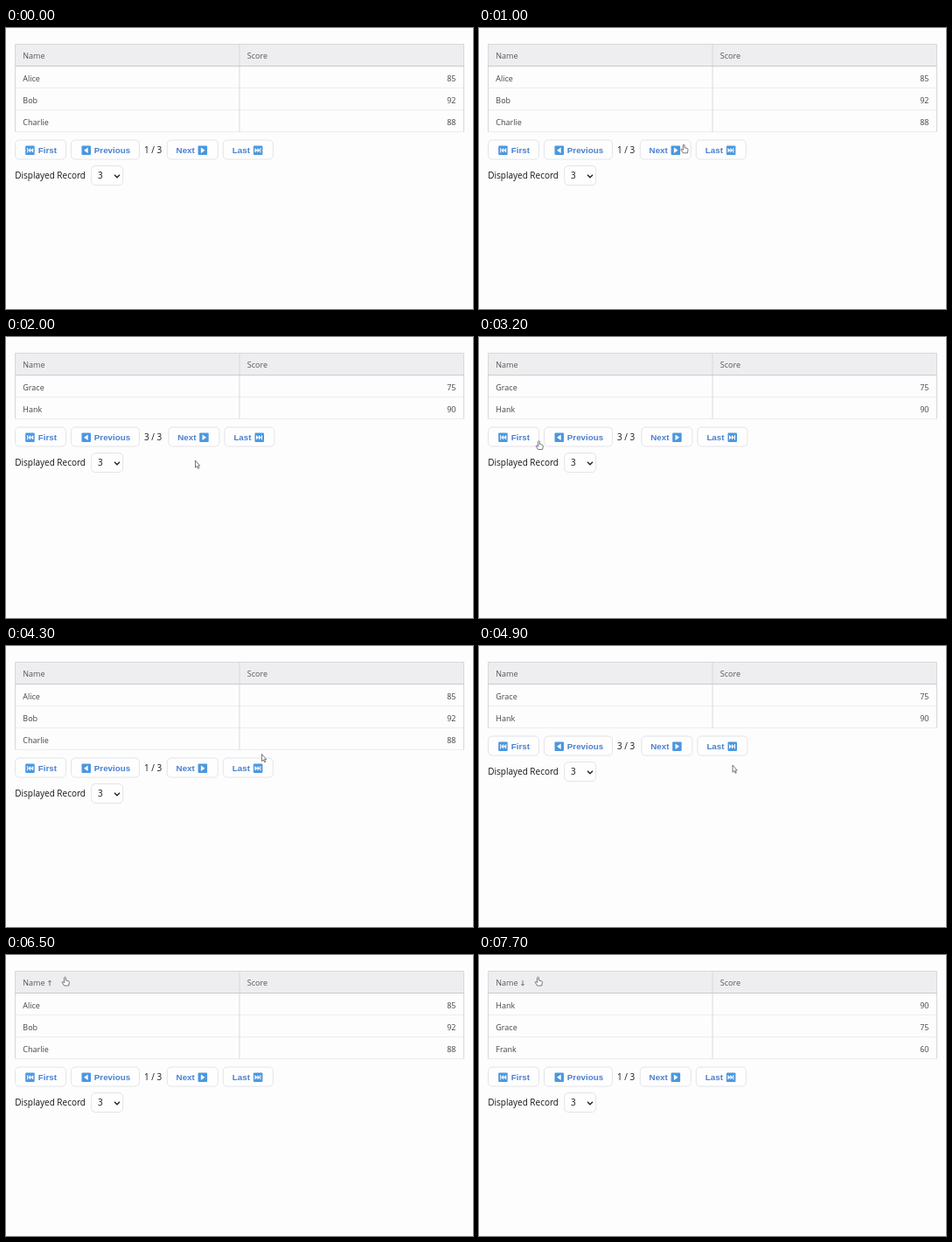
These frames come from a looping animation (534x321 px, 8 s). An HTML page:

```html
<!DOCTYPE html>
<html lang="en">
<head>
<meta charset="utf-8">
<title>Paged table</title>
<style>
  html, body { margin: 0; width: 100%; height: 100%; overflow: hidden; background: #fdfdfd; }
  svg { display: block; width: 100%; height: 100%; }
  text { font: 9px "Open Sans", "Noto Sans", sans-serif; fill: #444; white-space: pre; }
  .head { fill: #55565a; }
  .label { font-size: 10px; font-weight: 500; fill: #161616; }
  .button { font: bold 9.8px "Liberation Sans", Arial, sans-serif; fill: #4a80d0; }
  .end { text-anchor: end; }
</style>
</head>
<body>
<svg id="stage" viewBox="0 0 534 321"></svg>
<script>
const stage = document.getElementById('stage');
const LOOP = 8000;
const PAGE_SIZE = 3;
const records = [
  ['Alice', 85], ['Bob', 92], ['Charlie', 88], ['David', 70],
  ['Eve', 95], ['Frank', 60], ['Grace', 75], ['Hank', 90]
];

// [time, value]: each value holds until the next entry
const pages = [[0, 1], [1400, 2], [1800, 3], [3400, 1], [4600, 3], [6000, 1]];
const sorts = [[0, ''], [6500, 'up'], [6800, 'down'], [7050, ''], [7500, 'up'], [7700, 'down']];
const presses = [[0, ''], [1300, 'Next'], [1400, ''], [1720, 'Next'], [1800, ''], [3300, 'First'], [3400, ''],
  [4500, 'Last'], [4600, ''], [5650, 'First'], [6000, '']];

// [time, x, y] of the pointer tip
const path = [
  [400, 322, 0], [800, 262, 120], [1150, 216.5, 141], [2200, 216.5, 141], [3200, 68.5, 118.5],
  [3300, 45, 115], [4100, 45, 115], [4300, 292.5, 123.5], [4450, 290, 136], [4950, 290, 136],
  [5300, 25.5, 112], [6000, 25.5, 112], [6300, 67.5, 25], [8000, 67.5, 25]
];

const holdAt = (list, t) => list.filter(([start]) => start <= t).pop()[1];

function pointerAt(t) {
  const i = path.findIndex(([time]) => time > t);
  if (i < 1) return null;
  const [t0, x0, y0] = path[i - 1], [t1, x1, y1] = path[i];
  const p = (t - t0) / (t1 - t0), e = p * p * (3 - 2 * p);
  return { x: x0 + (x1 - x0) * e, y: y0 + (y1 - y0) * e };
}

const text = (x, y, value, cls = '') => `<text x="${x}" y="${y}" class="${cls}">${value}</text>`;
const line = (d, color, width = 1) => `<path d="${d}" fill="none" stroke="${color}" stroke-width="${width}"/>`;
const box = (x, y, w, h, fill) =>
  `<rect x="${x}" y="${y}" width="${w}" height="${h}" rx="4.5" fill="${fill}" stroke="#e3e4e8"/>`;

const glyphs = {
  First: 'M2 2.6h1v5.3h-1zM6 2.6v5.3l-3-2.65zM9 2.6v5.3l-3-2.65z',
  Previous: 'M7.2 2v6.5l-4.6-3.25z',
  Next: 'M3.3 2v6.5l4.6-3.25z',
  Last: 'M7.5 2.6h1v5.3h-1zM1.5 2.6v5.3l3-2.65zM4.5 2.6v5.3l3-2.65z'
};

function icon(name, x, y) {
  return `<g transform="translate(${x} ${y})">
    <rect width="10.5" height="10.5" rx="1" fill="#4b97df"/><path d="${glyphs[name]}" fill="#fff"/></g>`;
}

function table(rows, sort) {
  const bottom = 43.5 + rows.length * 25;
  const arrow = sort === 'up' ? 'M50 35.2v-6m-1.7 1.9l1.7-1.9 1.7 1.9' : 'M50 29v6m-1.7-1.9l1.7 1.9 1.7-1.9';
  return `<rect x="10.5" y="18.5" width="513" height="25" fill="#eeeef0"/>`
    + rows.map(([name, score], i) => {
        const y = 60.5 + i * 25;
        return line(`M10.5 ${68.5 + i * 25}h513`, '#ededee') + text(19.3, y, name) + text(514.5, y, score, 'end');
      }).join('')
    + line(`M10.5 ${bottom}V18.5h513V${bottom}M267 18.5V${bottom}`, '#d8d8dc')
    + line('M10.5 43.5h513', '#cbcbcf')
    + text(19.3, 35, 'Name', 'head') + text(275.8, 35, 'Score', 'head')
    + (sort && line(arrow, '#55565a', .8));
}

function pointer({ x, y }, isHand) {
  const shape = isHand
    ? 'M-.9 .8Q0-.5 .9 .8V4L4 4.7Q5 5 4.8 6.4L4.2 10H-.9L-3.2 6.5Q-3.4 5.3-2.2 5.6L-.9 6.7z'
    : 'M0 0V8.2L1.8 6.6 3.1 9.3 4.3 8.7 3 6.1H5.2z';
  return `<path transform="translate(${x} ${y})" d="${shape}" fill="#fff" stroke="#55565c" stroke-width=".8" stroke-linejoin="round"/>`;
}

function draw(t) {
  const page = holdAt(pages, t), sort = holdAt(sorts, t), pressed = holdAt(presses, t);
  const ordered = sort === 'down' ? [...records].reverse() : records;
  const rows = ordered.slice((page - 1) * PAGE_SIZE, page * PAGE_SIZE);
  const top = 53.5 + rows.length * 25 - .5;
  const shift = page === 1 ? 0 : 1.6;
  // name, left edge, width, text offset, icon offset
  const buttons = [
    ['First', 10.5, 58, 26.3, 11.7], ['Previous', 74.5, 78, 26.3, 12],
    ['Next', 184.3 + shift, 58, 10.3, 35.3], ['Last', 248.3 + shift, 57, 10.5, 34.6]
  ];
  const tip = pointerAt(t);
  const inside = (x, y, w, h) => tip && tip.x >= x && tip.x <= x + w && tip.y >= y && tip.y <= y + h;
  const isHand = inside(10, 18, 514, 26) || buttons.some(([, x, w]) => inside(x, top, w + .5, 22));

  stage.innerHTML = table(rows, sort)
    + buttons.map(([name, x, w, textX, iconX]) =>
        box(x, top - .5 + .5, w, 22, pressed === name ? '#ebebed' : '#fefefe')
        + icon(name, x + iconX, top + 6.5) + text(x + textX, top + 15.2, name, 'button')).join('')
    + text(158, top + 15.2, `${page} / 3`, 'label')
    + text(10.2, top + 44.3, 'Displayed Record', 'label')
    + box(97.7, top + 29.5, 36, 22, '#fefefe')
    + text(105, top + 44.4, PAGE_SIZE, 'label')
    + line(`M124 ${top + 39.7}l3 3 3-3`, '#222', 1.4)
    + (tip ? pointer(tip, isHand) : '');
}

function frame(now) {
  draw(now % LOOP);
  requestAnimationFrame(frame);
}
draw(0);
requestAnimationFrame(frame);
</script>
</body>
</html>
```
